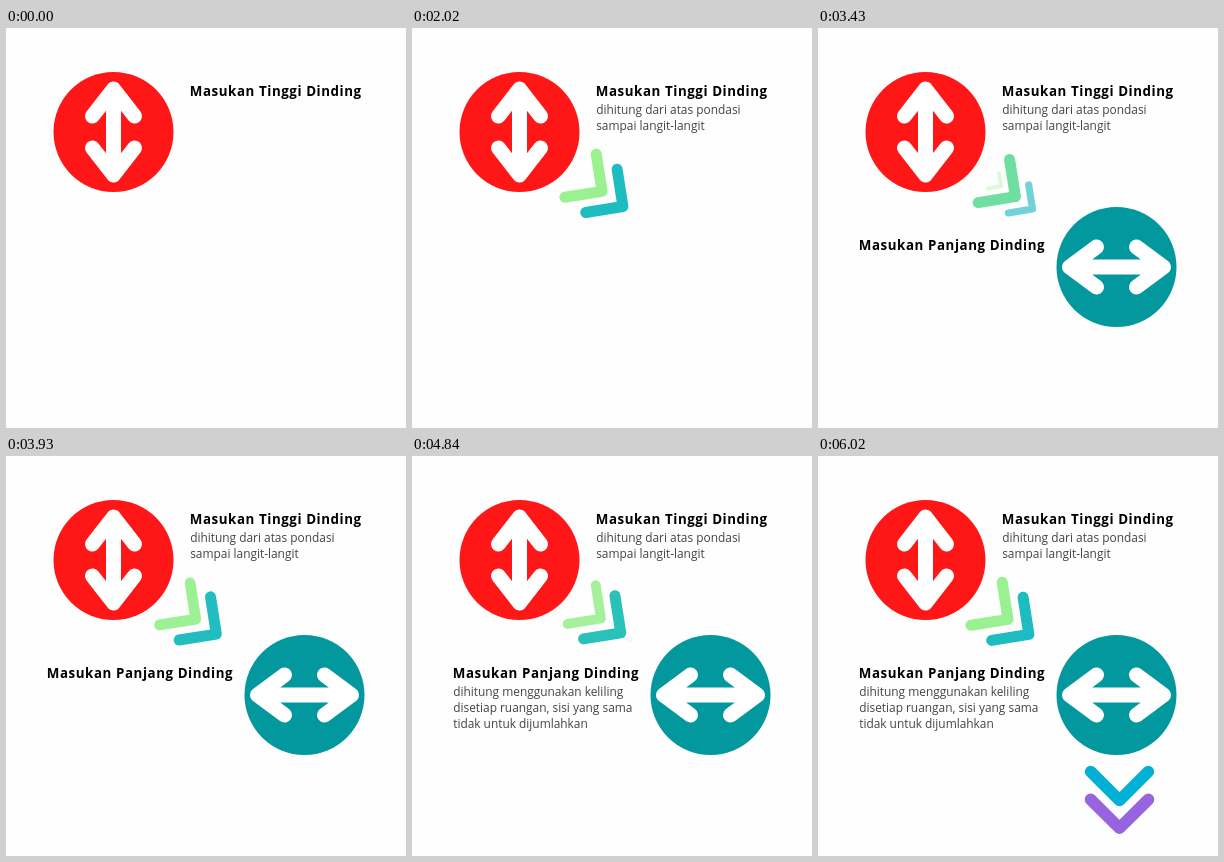
An HTML page for the animation above (6.06 s loop, 400 px wide and 400 px high).

```html
<!DOCTYPE html>
<html lang="id">
<head>
<meta charset="utf-8">
<title>Panduan ukuran dinding</title>
<style>
  html, body { margin: 0; width: 100%; height: 100%; overflow: hidden; background: #fefefe; }
  svg { display: block; width: 100%; height: 100%; }
  text { font: 400 11.9px "Open Sans", sans-serif; fill: #444; }
  .title { font-weight: 700; font-size: 13.33px; letter-spacing: .58px; fill: #000; }
  path { fill: none; stroke-linecap: round; stroke-linejoin: round; }
  .arrow { stroke: #fff; stroke-width: 15; }
  .chevron { stroke-width: 11; }
</style>
</head>
<body>
<svg viewBox="0 0 400 400">
  <circle cx="107.5" cy="104" r="60" fill="#ff1616"/>
  <path class="arrow" transform="translate(107.5 104)"
    d="M0-43V43M-21-16L0-43L21-16M-21 16L0 43L21 16"/>
  <text class="title" x="183.8" y="68">Masukan Tinggi Dinding</text>
  <g data-from="1010">
    <text x="184.2" y="85.5">dihitung dari atas pondasi</text>
    <text x="184.2" y="101.7">sampai langit-langit</text>
  </g>
  <g id="upper"></g>
  <g data-from="3030">
    <circle cx="298.5" cy="239" r="60" fill="#03989e"/>
    <path class="arrow" transform="translate(298.5 239)"
      d="M-47 0H47M-20-20L-47 0L-20 20M20-20L47 0L20 20"/>
    <text class="title" x="40.8" y="221.5">Masukan Panjang Dinding</text>
  </g>
  <g data-from="4040">
    <text x="41.2" y="240">dihitung menggunakan keliling</text>
    <text x="41.2" y="256.2">disetiap ruangan, sisi yang sama</text>
    <text x="41.2" y="272.4">tidak untuk dijumlahkan</text>
  </g>
  <g id="lower"></g>
</svg>
<script>
const LOOP = 6060, SCENE = 1010, SPACING = 25.8;
// The chevrons advance at 12.5 steps per second, shown on a 30 Hz clock.
const stepStarts = Array.from({ length: 13 }, (_, k) => Math.round(Math.ceil(2.4 * k - 1e-6) * 10 / 3) * 10);

const ease = p => p * p * (3 - 2 * p);
const mix = (a, b, p) => `rgb(${a.map((v, i) => Math.round(v + (b[i] - v) * p))})`;

function makeFlow(id, start, transform, near, far, end) {
  const group = document.getElementById(id);
  group.setAttribute("transform", transform);
  const chevrons = [0, 1, 2].map(() => {
    const path = document.createElementNS("http://www.w3.org/2000/svg", "path");
    path.setAttribute("class", "chevron");
    path.setAttribute("d", "M-13.3-26.7L13.3 0L-13.3 26.7");
    return group.appendChild(path);
  });
  const place = (path, x, scale, color) => {
    path.setAttribute("transform", `translate(${x * SPACING} 0) scale(${scale})`);
    path.setAttribute("stroke", color);
    path.setAttribute("opacity", scale);
    path.style.display = scale > 0 ? "" : "none";
  };
  return (time, e) => {
    group.style.display = time >= start ? "" : "none";
    place(chevrons[0], 1 + e, 1 - e, mix(far, end, e));  // leaving
    place(chevrons[1], e, 1, mix(near, far, e));         // travelling
    place(chevrons[2], 0, e, mix(near, near, 0));        // arriving
  };
}

const flows = [
  makeFlow("upper", 2020, "translate(179.3 155.5) rotate(36)",
    [155, 240, 144], [29, 188, 192], [56, 186, 214]),
  makeFlow("lower", 5050, "translate(301.5 330) rotate(90) scale(1.08)",
    [0, 175, 215], [150, 100, 222], [150, 100, 222])
];
const timed = [...document.querySelectorAll("[data-from]")];

function draw(now) {
  const time = now % LOOP;
  const phase = stepStarts.findLast(s => s <= time % SCENE + 0.01) / 1000;
  timed.forEach(g => g.style.display = time >= +g.dataset.from ? "" : "none");
  flows.forEach(flow => flow(time, ease(phase)));
}

const origin = performance.now();
function tick() {
  draw(performance.now() - origin);
  requestAnimationFrame(tick);
}
tick();
</script>
</body>
</html>
```
